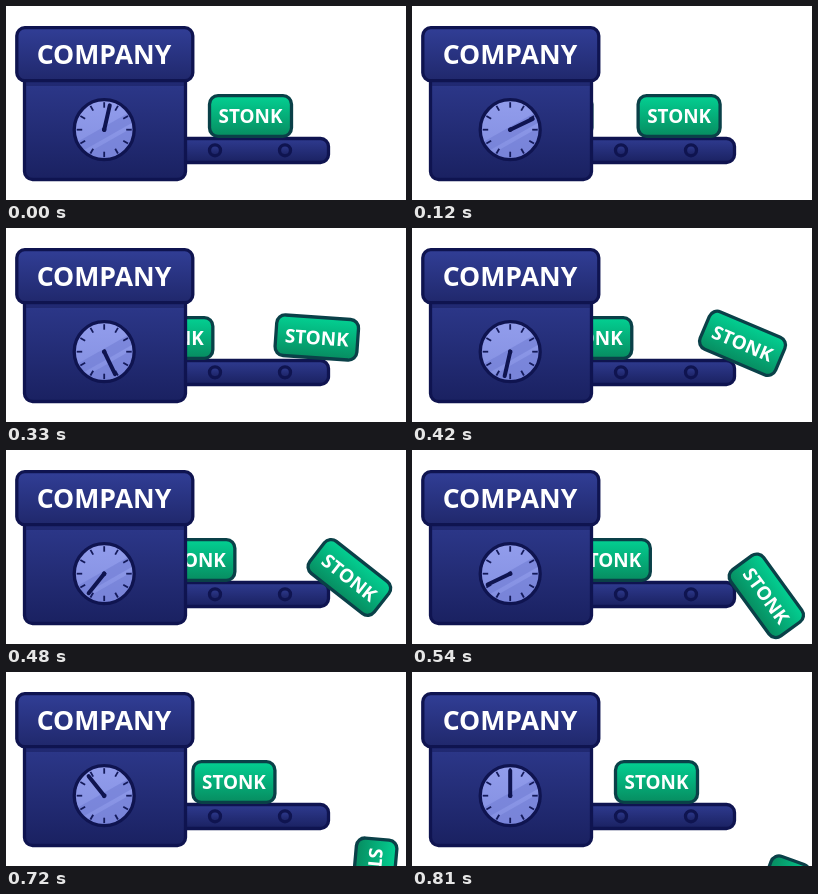
An HTML page for the animation above (0.84 s loop, 400 by 194 pixels).

```html
<!DOCTYPE html>
<html lang="en">
<head>
<meta charset="utf-8">
<title>Stonk machine</title>
<style>
  html, body { margin: 0; width: 100%; height: 100%; overflow: hidden; background: #fff; }
  svg { display: block; width: 400px; height: 194px; }
  text { font-family: "Open Sans", "Noto Sans", sans-serif; font-weight: 700; fill: #fff; text-anchor: middle; }
  .line { stroke: #0f1450; stroke-width: 3.3; }
  .crate { stroke: #0a4048; stroke-width: 3.3; }
</style>
</head>
<body>
<svg viewBox="0 0 400 194">
  <defs>
    <linearGradient id="roof" x2="0" y2="1">
      <stop stop-color="#313e96"/><stop offset="1" stop-color="#20286c"/>
    </linearGradient>
    <linearGradient id="wall" x2="0" y2="1">
      <stop stop-color="#2f3b90"/><stop offset="1" stop-color="#1a2161"/>
    </linearGradient>
    <linearGradient id="green" x2="0" y2="1">
      <stop stop-color="#03d092"/><stop offset="1" stop-color="#078c60"/>
    </linearGradient>
    <linearGradient id="glass" x2="0" y2="1">
      <stop stop-color="#929dec"/><stop offset="1" stop-color="#828ee0"/>
    </linearGradient>
    <clipPath id="face"><circle r="29"/></clipPath>
    <g id="crate">
      <rect class="crate" x="-41" y="-20.3" width="82" height="40.6" rx="8.5" fill="url(#green)"/>
      <text y="7" font-size="18.9">STONK</text>
    </g>
  </defs>

  <g class="line" fill="url(#wall)">
    <rect x="150" y="132.5" width="172.5" height="24" rx="8"/>
    <circle cx="209" cy="144.3" r="5.5"/>
    <circle cx="279" cy="144.3" r="5.5"/>
  </g>

  <use id="next" href="#crate"/>
  <use id="falling" href="#crate"/>

  <rect class="line" x="18.5" y="60" width="161" height="113.5" rx="8" fill="url(#wall)"/>
  <rect x="20" y="75" width="158" height="5" fill="#171d5c" opacity=".5"/>
  <rect class="line" x="10.8" y="21.7" width="176" height="53" rx="8" fill="url(#roof)"/>
  <text x="98" y="58" font-size="26.6">COMPANY</text>

  <g transform="translate(98.2 123.7)">
    <circle r="30" fill="url(#glass)"/>
    <g clip-path="url(#face)" fill="#727ed4" opacity=".6">
      <path d="M-30 14L30 -20V-8L-30 26Z"/>
      <path d="M-30 31L30 -3V30H-30Z"/>
    </g>
    <circle class="line" r="30" fill="none"/>
    <g id="ticks" stroke="#141a5a" stroke-width="1.8"></g>
    <g id="hand" fill="#0f1450">
      <path d="M0 0V-25" stroke="#0f1450" stroke-width="4" stroke-linecap="round"/>
      <circle r="2.3"/>
    </g>
  </g>
</svg>
<script>
  const STEP = 30, COUNT = 28;
  const $ = id => document.getElementById(id);

  $('ticks').innerHTML = Array.from({ length: 12 }, (_, k) =>
    `<path d="M0 -27.5V-22" transform="rotate(${k * 30})"/>`).join('');

  // Monotone cubic curve through a few points
  function curve(ts, vs) {
    const slope = vs.slice(1).map((v, k) => (v - vs[k]) / (ts[k + 1] - ts[k]));
    const tan = vs.map((_, k) => {
      const a = slope[k - 1] ?? slope[k], b = slope[k] ?? a;
      return a * b > 0 ? 2 * a * b / (a + b) : 0;
    });
    return t => {
      let k = 0;
      while (k < ts.length - 2 && t > ts[k + 1]) k++;
      const h = ts[k + 1] - ts[k], s = (t - ts[k]) / h, r = 1 - s;
      return vs[k] * r * r * (1 + 2 * s) + vs[k + 1] * s * s * (3 - 2 * s)
        + h * s * r * (tan[k] * r - tan[k + 1] * s);
    };
  }

  const keys = [0, 7, 11, 14, 18, 22, 27];
  const fallX = curve(keys, [244.5, 284.7, 310.8, 330.5, 354.3, 368, 367]);
  const fallY = curve(keys, [110, 110, 109.5, 115.3, 145.8, 193, 227]);
  const tilt = curve(keys, [0, 0, 4, 23, 54, 84, 110]);

  function place(id, x, y, angle = 0) {
    $(id).setAttribute('transform', `translate(${x} ${y}) rotate(${angle})`);
  }

  function draw(now) {
    const i = Math.floor(now / STEP) % COUNT, left = COUNT - 1 - i;
    place('next', 244.5 - 5.66 * left + 0.0465 * left * left, 110);
    place('falling', fallX(i), fallY(i), tilt(i));
    place('hand', 0, 0, (i + 1) * 360 / COUNT);
  }

  const start = performance.now();
  function loop() {
    draw(performance.now() - start);
    requestAnimationFrame(loop);
  }
  loop();
</script>
</body>
</html>
```
